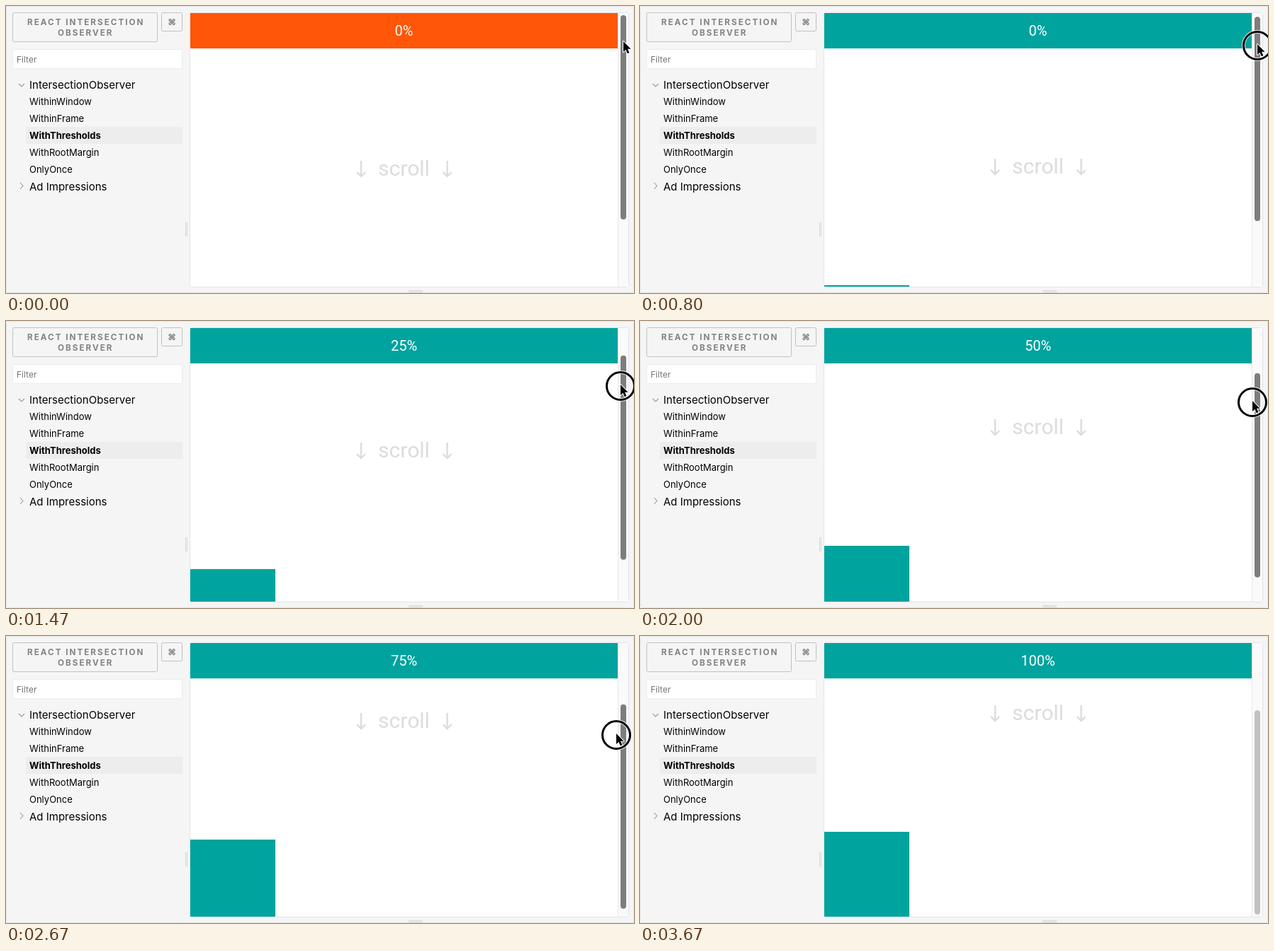
An HTML page with a canvas that plays this animation: 886 px wide and 406 px high, repeating every 3.74 s.

```html
<!DOCTYPE html>
<html lang="en">
<head>
<meta charset="utf-8">
<title>Intersection observer thresholds</title>
<style>
  html, body { margin: 0; width: 100%; height: 100%; overflow: hidden; background: #f5f5f5; }
  canvas { display: block; }
</style>
</head>
<body>
<canvas id="stage" width="886" height="406"></canvas>
<script>
const ctx = document.getElementById('stage').getContext('2d');
const LOOP = 3740;
const STEP = LOOP / 56;
const MAX_SCROLL = 121;
const TEAL = '#00a39e';
const UI = 'Inter, sans-serif';
const PAGE = 'Roboto, sans-serif';

// time, scroll offset, pointer x, pointer y
const KEYS = [
  [0, 0, 871, 52],
  [400, 0, 871, 56],
  [670, 0, 871, 56],
  [800, 3, 871, 56],
  [1070, 14, 870, 66],
  [1470, 47, 867, 92],
  [2000, 80, 864, 115],
  [2130, 87, 864, 120],
  [2330, 97, 863, 128],
  [2670, 110, 861, 140],
  [2800, 121, 859, 150],
  [2930, 121, 858, 161],
  [LOOP, 121, 858, 161]
];
const PRESS = 500, RELEASE = 3170, FADE_END = 3400, POINTER_END = 3330;

function poseAt(t) {
  const i = Math.max(1, KEYS.findIndex(key => key[0] >= t));
  const from = KEYS[i - 1], to = KEYS[i];
  const p = (t - from[0]) / (to[0] - from[0]);
  const [, scroll, x, y] = from.map((v, n) => v + (to[n] - v) * p);
  return { scroll: Math.round(scroll), x: Math.round(x), y: Math.round(y) };
}

function rect(x, y, w, h, color) {
  ctx.fillStyle = color;
  ctx.fillRect(x, y, w, h);
}

function box(x, y, w, h, radius, fill, border) {
  ctx.beginPath();
  ctx.roundRect(x, y, w, h, radius);
  if (fill) { ctx.fillStyle = fill; ctx.fill(); }
  if (border) { ctx.strokeStyle = border; ctx.lineWidth = 1; ctx.stroke(); }
}

function line(points, color, width) {
  ctx.beginPath();
  points.forEach(([x, y]) => ctx.lineTo(x, y));
  ctx.strokeStyle = color;
  ctx.lineWidth = width;
  ctx.stroke();
}

function text(str, x, y, font, color, align = 'left', spacing = 0) {
  ctx.font = font;
  ctx.fillStyle = color;
  ctx.textAlign = align;
  ctx.letterSpacing = spacing + 'px';
  ctx.fillText(str, x, y);
}

function drawSidebar() {
  const title = `bold 11.7px ${UI}`;
  box(9.5, 9.5, 204, 41, 2, null, '#c1c1c1');
  text('REACT INTERSECTION', 30, 27, title, '#828282', 'left', 2);
  text('OBSERVER', 73, 42, title, '#828282', 'left', 2);
  box(219.5, 9.5, 29, 26, 2, null, '#c1c1c1');
  text('⌘', 234, 27, `bold 12px Inter, "DejaVu Sans", sans-serif`, '#777', 'center');
  box(9.5, 61.5, 239, 27, 2, '#fff', '#ececec');
  text('Filter', 15, 80, `12px ${UI}`, '#757575');

  rect(28, 171, 221, 24, '#ededed');
  line([[18, 110], [22, 114], [26, 110]], '#999', 1.1);
  line([[20, 250], [24, 254.5], [20, 259]], '#999', 1.1);
  text('IntersectionObserver', 33, 117, `15px ${UI}`, '#000');
  ['WithinWindow', 'WithinFrame', 'WithThresholds', 'WithRootMargin', 'OnlyOnce'].forEach((name, i) =>
    text(name, 33, 140 + i * 24, `${i === 2 ? 'bold ' : ''}13px ${UI}`, '#000'));
  text('Ad Impressions', 33, 261, `15px ${UI}`, '#000');
}

function drawFrame() {
  rect(0, 0, 886, 406, '#f5f5f5');
  box(0.5, 0.5, 885, 405, 3, null, '#e6e6e6');
  for (const offset of [0, 2]) {
    rect(253 + offset, 306, 1, 20, '#d6d6d6');
    rect(568, 402 + offset, 20, 1, '#d6d6d6');
  }
  box(259.5, 9.5, 619, 388, 3, '#fff', '#e4e4e4');
}

function drawPage(scroll) {
  const grey = '#dcdcdc';
  const y = 230 - scroll;
  text('scroll', 561.5, y + 10, `30px ${PAGE}`, grey, 'center');
  for (const x of [501, 622.5]) {
    line([[x, y - 11], [x, y + 11]], grey, 2.4);
    line([[x - 6, y + 5], [x, y + 11], [x + 6, y + 5]], grey, 2.4);
  }
  const top = 398 - scroll;
  if (top < 397) rect(260, top, 120, 397 - top, TEAL);

  const percent = Math.min(100, Math.floor(scroll / 30) * 25);
  rect(260, 10, 603, 50, scroll > 0 ? TEAL : '#ff5608');
  text(percent + '%', 561.5, 42, `20px ${PAGE}`, '#fff', 'center');
}

function drawScrollbar(scroll, t) {
  const fade = Math.min(1, Math.max(0, (t - RELEASE) / (FADE_END - RELEASE)));
  const shade = Math.round(125 + 68 * fade);
  rect(863, 10, 15, 387, '#fafafa');
  rect(863, 10, 1, 387, '#e8e8e8');
  box(867, 13 + scroll * 92 / MAX_SCROLL, 8, 289, 4, `rgb(${shade},${shade},${shade})`);
}

function drawPointer({ x, y }, pressed) {
  if (pressed) {
    for (const [color, width] of [['rgba(255,255,255,.8)', 5], ['#000', 3]]) {
      ctx.beginPath();
      ctx.arc(x, y, 19.5, 0, Math.PI * 2);
      ctx.strokeStyle = color;
      ctx.lineWidth = width;
      ctx.stroke();
    }
  }
  ctx.save();
  ctx.translate(x, y - 2);
  ctx.beginPath();
  [[0, 0], [0, 15], [3.4, 11.8], [5.8, 17.2], [8.4, 16], [6, 10.8], [10.6, 10.8]]
    .forEach(([px, py]) => ctx.lineTo(px, py));
  ctx.closePath();
  ctx.lineJoin = 'round';
  ctx.strokeStyle = '#fff';
  ctx.lineWidth = 2;
  ctx.stroke();
  ctx.fillStyle = '#000';
  ctx.fill();
  ctx.restore();
}

function draw(now) {
  const t = Math.floor((now % LOOP + 3) / STEP) % 56 * STEP;
  const pose = poseAt(t);
  drawFrame();
  drawSidebar();
  drawPage(pose.scroll);
  drawScrollbar(pose.scroll, t);
  if (t < POINTER_END) drawPointer(pose, t >= PRESS && t < RELEASE);
}

const start = performance.now();
function tick() {
  draw(performance.now() - start);
  requestAnimationFrame(tick);
}
tick();
</script>
</body>
</html>
```
